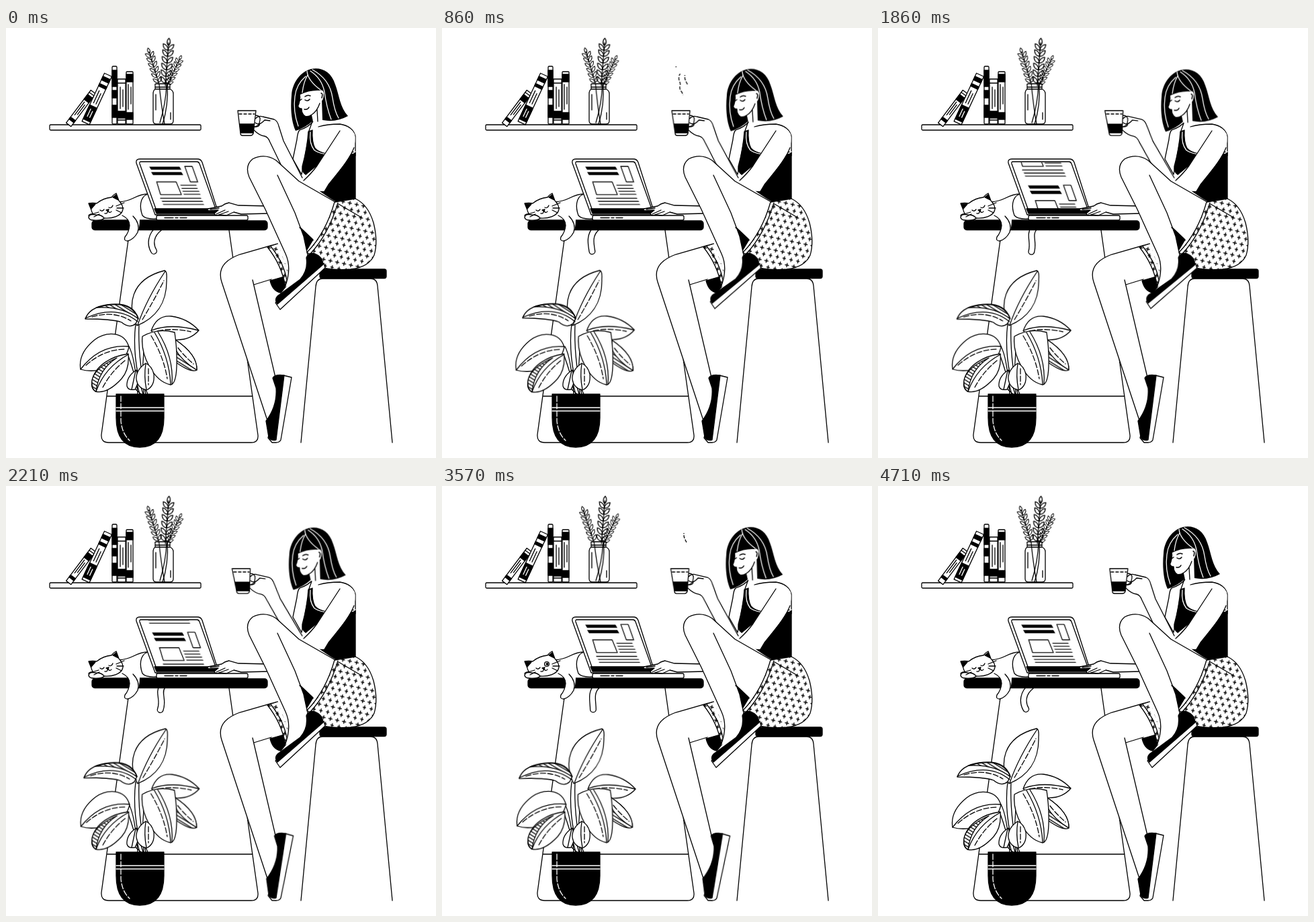
Recreate the animation shown at these times as an HTML page without scripts. Size 640 by 640 pixels, loop 4780 ms.

```html
<!DOCTYPE html>
<html lang="en">
<head>
<meta charset="utf-8">
<title>Coffee break</title>
<style>
  html, body { margin: 0; width: 100%; height: 100%; overflow: hidden; background: #fff; }
  svg { display: block; width: 100vw; height: 100vh; fill: none; stroke: #000; stroke-width: 1.3; stroke-linecap: round; stroke-linejoin: round; }
  .w { fill: #fff; }
  .b { fill: #000; }
  .paper { fill: #fff; stroke: none; }
  .light { stroke: #fff; fill: none; }
  .dash { stroke-dasharray: 8 3; }
  .tick { stroke-dasharray: 4 3; }
  .plus { fill: url(#plus); }
  .hatch { fill: url(#hatch); }
  .leaflets path, .leaflets use { vector-effect: non-scaling-stroke; }

  /* Cup arm, head and steam share one slow lean */
  .arm, .head, .steam { animation: 4.78s cubic-bezier(.3,.15,.7,.85) infinite; }
  .arm { animation-name: arm; transform-origin: 442px 225px; }
  .head { animation-name: head; }
  .steam { animation-name: steam; }
  @keyframes arm { 50% { transform: skewX(5deg); } }
  @keyframes head { 50% { transform: translate(-3.5px, 1.7px); } }
  @keyframes steam { 50% { transform: translateX(-8px); } }

  .sway { animation: sway 4.78s ease-in-out infinite; transform-origin: 200px 545px; }
  .sprig { transform-origin: 235px 143px; animation-delay: -4.5s; }
  @keyframes sway {
    0%, 100% { transform: rotate(0); }
    19% { transform: rotate(calc(var(--a) * 1deg)); }
    64% { transform: rotate(calc(var(--a) * -2deg)); }
  }

  .tap { animation: tap 4.78s ease-in-out infinite; transform-origin: 460px 345px; }
  @keyframes tap { 0%, 9%, 46%, 100% { transform: rotate(0); } 30% { transform: rotate(4deg); } }
  .heel { animation: heel 4.78s ease-in-out infinite; transform-origin: 402px 614px; }
  @keyframes heel { 0%, 37.5%, 85.5%, 100% { transform: rotate(0); } 61% { transform: rotate(5.4deg); } }

  .scroll { animation: scroll 4.78s linear infinite; }
  @keyframes scroll { 0%, 20% { transform: none; } 51.5%, 100% { transform: translateY(-70px); } }

  .open { animation: peek 4.78s step-end infinite; opacity: 0; }
  .shut { animation: hide 4.78s step-end infinite; }
  @keyframes peek { 55% { opacity: 1; } 80% { opacity: 0; } }
  @keyframes hide { 55% { opacity: 0; } 80% { opacity: 1; } }
</style>
</head>
<body>
<svg viewBox="0 0 640 640">
  <defs>
    <pattern id="plus" width="10.4" height="18" patternUnits="userSpaceOnUse" patternTransform="rotate(12)">
      <path d="M0 0H11V18H0Z" class="paper"/>
      <path d="M1 4.500h5M3.500 2v5M6 13.500h4M8 11v5" stroke-width="1.400"/>
    </pattern>
    <pattern id="hatch" width="10" height="4.500" patternUnits="userSpaceOnUse" patternTransform="rotate(32)">
      <path d="M0 0H10V5H0Z" class="paper"/>
      <path d="M-1 2H11"/>
    </pattern>
    <clipPath id="screen"><path d="M200 200H286L312 269H222Z"/></clipPath>
    <clipPath id="puffA"><rect x="330" width="50" y="118" height="0">
      <animate attributeName="y" dur="4.78s" repeatCount="indefinite" keyTimes="0;.02;.1;.18;.481;.613;.732;1" values="118;118;62;57;118;61;57;57" />
      <animate attributeName="height" dur="4.78s" repeatCount="indefinite" keyTimes="0;.02;.1;.18;.19;.481;.613;.732;1" values="0;0;38;3;0;0;33;0;0"/>
    </rect></clipPath>
    <clipPath id="puffB"><rect x="330" width="50" y="118" height="0">
      <animate attributeName="y" dur="4.78s" repeatCount="indefinite" keyTimes="0;.04;.18;.272;.533;.613;.67;.74;1" values="118;118;68;68;118;86;68;68;68"/>
      <animate attributeName="height" dur="4.78s" repeatCount="indefinite" keyTimes="0;.04;.18;.272;.533;.613;.67;.74;1" values="0;0;32;0;0;23;27;0;0"/>
    </rect></clipPath>
    <clipPath id="puffC"><rect x="330" width="50" y="118" height="0">
      <animate attributeName="y" dur="4.78s" repeatCount="indefinite" keyTimes="0;.07;.18;.23;.586;.613;.69;.747;1" values="118;118;70;70;118;107;70;70;70"/>
      <animate attributeName="height" dur="4.78s" repeatCount="indefinite" keyTimes="0;.07;.18;.23;.586;.613;.69;.747;.785;1" values="0;0;14;0;0;8;30;14;0;0"/>
    </rect></clipPath>

    <path id="pair" d="M0 0C0-5 4-9 8-9C8-4 5 0 0 0C0-5-4-9-8-9C-8-4-5 0 0 0"/>
    <g id="branch">
      <path d="M0 0V-64M0-60C-4-64-2-69 0-71C2-69 4-64 0-60"/>
      <use href="#pair" y="-4"/><use href="#pair" y="-14"/><use href="#pair" y="-24"/>
      <use href="#pair" y="-34"/><use href="#pair" y="-44"/><use href="#pair" y="-53"/>
    </g>
    <g id="page">
      <path class="b" d="M0 6.500H45L46 11H1ZM0 14.500H45L46 19H1Z" stroke="none"/>
      <path d="M53 6H64V29H53ZM3 29H32L33 48H2Z"/>
      <path d="M37 34H60M37 38.500H60M37 43H61M37 47.500H61M0 53.500H60M1 58H61M1 62.500H61" stroke-width="1.200"/>
    </g>
  </defs>

  <path d="M0 0H640V640H0Z" class="paper"/>

  <!-- Shelf, books, jar -->
  <g>
    <rect x="65" y="144" width="225" height="8" rx="1.500"/>
    <g transform="translate(92 138) rotate(37)">
      <path class="w" d="M0 0V-57H9V4H0Z"/>
      <path class="b" d="M0-49H9V-40H0ZM0-7H9V-3H0Z"/><path d="M0-53H9M3-37V-13M6-34V-16"/>
    </g>
    <g transform="translate(114 137) rotate(25)">
      <path class="w" d="M0 0V-77H12V2H0Z"/>
      <path class="b" d="M0-72H12V-66H0ZM0-60H12V-56H0ZM0-25H12V-2H0Z"/><path d="M4-50V-30M8-47V-30"/>
      <path class="light" d="M4-20V-8M8-18V-8"/>
    </g>
    <rect class="w" x="158" y="57" width="7" height="86" rx="1.500"/>
    <path class="b" d="M158 63H165V87H158ZM158 93H165V104H158ZM158 115H165V133H158Z"/>
    <rect class="w" x="166" y="76" width="12" height="67"/>
    <path class="b" d="M166 124H178V134H166Z"/>
    <path d="M166 82H178M170 88V120M174 92V117M166 137H178"/>
    <rect class="w" x="179" y="65" width="10" height="78" rx="1"/>
    <path class="b" d="M179 69H189V80H179ZM179 126H189V136H179Z"/>
    <path d="M182 84V121M186 88V113"/>

    <g class="leaflets">
      <g class="sway sprig" style="--a:.8"><path d="M228 84Q231 115 236 143"/><use href="#branch" transform="translate(228 84) rotate(-17) scale(.8)"/></g>
      <g class="sway sprig" style="--a:-.4"><path d="M239 84Q238 112 229 141M240 84Q242 115 233 143"/><use href="#branch" transform="translate(240 86) rotate(25) scale(.7)"/></g>
      <g class="sway sprig" style="--a:-.1"><use href="#branch" transform="translate(237 86) rotate(4.500)"/></g>
    </g>
    <path d="M222 85Q221 83 224 83H242Q246 83 244 85V91H222ZM222 91Q219 93 219 98V138Q219 143 224 143H244Q249 143 249 138V98Q249 93 244 91M222 88H244M223 99V122M245 126V136"/>
  </g>

  <!-- Desk frame -->
  <path d="M184 301L142 605Q141 617 153 617H365Q376 617 375 606L332 301M151 548H367"/>

  <!-- Cat tail -->
  <g>
    <path stroke-width="10" d="M228 298C215 308 214 322 220 332"><animate id="tail" attributeName="d" dur="4.78s" repeatCount="indefinite" calcMode="spline" keySplines=".3 .15 .7 .85;.3 .15 .7 .85" keyTimes="0;.49;1" values="M228 298C215 308 214 322 220 332;M233 298C226 308 236 318 230 333;M228 298C215 308 214 322 220 332"/></path>
    <path stroke="#fff" stroke-width="7.400" d="M228 298C215 308 214 322 220 332"><animate attributeName="d" dur="4.78s" repeatCount="indefinite" calcMode="spline" keySplines=".3 .15 .7 .85;.3 .15 .7 .85" keyTimes="0;.49;1" values="M228 298C215 308 214 322 220 332;M233 298C226 308 236 318 230 333;M228 298C215 308 214 322 220 332"/></path>
  </g>

  <!-- Far leg and stool -->
  <path class="w" d="M411 319L348 337Q312 350 321 378L388 584L401 518L368 382L397 374" stroke="none"/>
  <path d="M411 319L348 337Q312 350 321 378L389 584M401 520L367 375M369 382L395 374"/>
  <g class="heel">
    <path class="w" d="M413 517L425 520L409 613Q407 617 402 617H396L390 610Z"/>
    <path class="b" d="M397 521Q400 515 414 517L402 613Q394 615 391 609L387 585Q404 562 402 536Z"/>
  </g>
  <path class="b" d="M393 376L414 370L417 384L409 394Q397 392 393 376ZM438 297L457 315L448 330L440 312Z"/>
  <path class="plus" d="M389 326L411 319Q426 335 424 352L416 385Q410 352 389 326Z"/>
  <path d="M394 325Q414 350 418 376"/>
  <path d="M439 617L461 385Q462 373 471 373H543Q552 373 553 384L575 617"/>
  <rect class="b" x="467" y="359" width="99" height="13.500" rx="3"/>

  <!-- Desk top, cat -->
  <rect class="b" x="128" y="287" width="261" height="13.500" rx="4"/>
  <path class="w" d="M168 259Q180 258 190 253Q202 247 211 247L230 255V286H130Q123 284 123 279Q125 276 132 277Z"/>
  <path d="M211 247C198 252 199 268 203 279Q208 285 224 284"/>
  <path class="paper" d="M175 279Q184 285 184 294Q183 304 177 311Q175 317 181 317Q190 315 196 304Q199 296 199 284Z"/>
  <path d="M173 279Q184 284 184 294Q183 304 177 311Q175 317 181 317Q190 315 196 304Q200 291 189 280"/>
  <path class="w" d="M127 271L123 261Q129 260 135 261Q145 253 157 252Q160 248 164 246L168 257Q174 263 174 270C172 280 158 284 146 283Q129 282 127 271Z"/>
  <path class="b" d="M127 269L124 262L133 262ZM159 252L164 248L167 256ZM149 271L153 270L152 273Z"/>
  <path class="w" d="M123 282Q124 276 134 278Q143 278 146 283Q143 287 130 286Q124 286 123 282Z"/>
  <path d="M151 273Q151 277 147 276M152 273Q155 276 157 273M140 271Q143 274 146 270M164 265L176 260M165 268L175 268M164 271L172 275M138 274L128 277M139 277L131 281"/>
  <path class="shut" d="M153 267Q157 269 159 264"/>
  <g class="open"><circle class="w" cx="156" cy="265" r="3.400"/><circle class="b" cx="156.500" cy="265" r="1.300"/></g>

  <!-- Laptop -->
  <path class="w" d="M222 278L194 201Q193 195 199 195H285Q290 195 292 200L317 278Z"/>
  <path d="M223 269L199 202Q198 199 201 199H284Q287 199 288 202L312 269"/>
  <path class="b" d="M221 269H312L315 276H224Z"/>
  <g clip-path="url(#screen)">
    <g transform="matrix(1 0 .355 1 211 200)"><g class="scroll"><use href="#page"/><use href="#page" y="70"/></g></g>
  </g>
  <rect class="w" x="224" y="279" width="136" height="7" rx="2"/>
  <path d="M236 282.500H249M252 282.500H256M259 282.500H269"/>

  <!-- Typing arm -->
  <path class="w" d="M390 265L346 264L332 260Q326 261 321 265L301 269Q298 272 304 272L316 271L310 276Q311 280 317 278L328 279L339 274L350 277L392 276"/>
  <path d="M313 277L326 271M317 278L331 273M304 270L317 268"/>

  <!-- Torso -->
  <path class="w" d="M457 139Q451 147 437 152Q434 155 433 166L427 195L440 218L447 180L452 152"/>
  <path class="paper" d="M452 150L466 140L500 144L520 158V192H448Z"/>
  <path d="M456 139L451 153M465 147Q478 143 497 143Q516 146 520 161V190"/>
  <path class="b" d="M450 154C449 170 447 184 441 206Q440 214 446 218L455 234L490 258L520 255V185L506 184L500 188Q470 190 460 179Q455 170 456 152Z"/>
  <path class="light" d="M453 155Q451 172 459 182Q468 188 482 188M509 186Q516 188 520 184"/>
  <path class="paper" d="M500 147L463 205L440 224L446 242L474 243L480 233C495 214 509 197 517 180Q521 168 519 158Q514 147 500 147Z"/>
  <path d="M497 153L463 205Q455 216 443 227M474 243L480 233C495 214 511 197 518 178"/>

  <!-- Head -->
  <g class="head">
    <path class="b" stroke="none" d="M454 61C438 65 426 82 425 100C423 120 425 140 431 153Q445 149 457 138L471 137Q491 141 509 131C497 118 496 100 490 84C484 65 470 58 454 61Z"/>
    <path class="paper" d="M454 125L457 139L465 144L471 138L470 106Z"/>
    <path class="paper" d="M438 99Q439 108 435 117Q436 120 440 120Q440 128 445 131Q449 133 455 129Q463 124 468 110Q473 108 473 97Q472 91 467 93Q452 92 438 99Z"/>
    <path d="M435 117Q436 120 440 120Q440 128 445 131Q449 133 455 129Q463 124 467 112M463 121L464 139"/>
    <path d="M444 121Q449 122 451 118M445 107Q449 110 452 106M437 108L440 106M445 102Q449 99 453 101M469 97Q472 97 470 104" stroke-width="1.500"/>
    <path class="light" d="M448 64Q449 78 468 92M446 72Q432 84 430 102Q427 124 435 146M453 64Q470 75 474 95Q477 118 484 136M456 62Q482 76 486 104Q489 124 495 134M449 70Q443 80 441 96"/>
  </g>

  <!-- Cup arm -->
  <g class="arm">
    <path class="w" stroke="none" d="M371 133Q377 129 383 132L402 137L407 148L414 170L443 226L424 232L391 167Q388 161 382 160L369 150Z"/>
    <path d="M371 135Q376 130 382 132L399 136Q404 138 406 146L413 168L441 223M371 141Q377 146 385 137L393 138M371 147Q377 147 378 142M369 152Q377 160 385 161Q390 162 393 170L422 230"/>
    <path d="M371 130Q379 130 378 137Q377 146 370 147"/>
    <path class="w" d="M345 123H372L368 157Q367 160 364 160H352Q349 160 349 157Z"/>
    <path class="b" d="M348 143H369.500L368 156H349.500Z"/>
    <path class="tick" d="M347 128H370"/>
  </g>

  <g class="steam tick">
    <path clip-path="url(#puffA)" d="M352 118C345 108 354 100 351 93S344 75 346 69S351 62 351 57"/>
    <path clip-path="url(#puffB)" d="M364 118C364 110 362 104 361 99S355 92 357 86S352 78 357 68"/>
    <path clip-path="url(#puffC)" d="M367 118C372 108 366 100 366 96S370 88 367 82S364 76 364 70"/>
  </g>

  <!-- Crossed leg and shorts -->
  <path class="paper" d="M490 258L436 228L402 197Q385 186 367 195Q355 205 362 222L386 270L422 346L416 386L450 345L443 310L430 275L464 316Z"/>
  <path class="paper" d="M404 219L449 337L425 376L386 270Z"/>
  <path d="M490 259L436 228L402 197Q385 186 367 195Q355 205 362 222L386 270L416 336Q426 358 415 386M404 219L430 275L443 310L449 338M437 297L457 316"/>
  <path class="plus" d="M489 259L520 254Q539 263 547 290Q554 318 548 338Q540 356 513 359Q490 361 473 357Q466 345 448 334Q476 305 489 259Z"/>
  <path d="M494 260Q480 307 453 336M495 262L529 282"/>
  <g class="tap">
    <path class="w" d="M473 350L475 357L408 419L401 409Z"/>
    <path class="b" d="M447 342Q451 333 460 336Q471 340 472 352L404 411Q399 405 404 399L438 374Q450 360 447 342Z"/>
  </g>

  <!-- Plant -->
  <g>
    <path d="M193 440Q187 490 204 545M198 440Q196 490 208 545M183 474Q192 490 196 545M208 458Q201 500 205 545M182 488Q190 510 199 545M208 538L211 545M192 537L201 545"/>
    <g class="sway" style="--a:-.4">
      <path class="w" d="M195 443C180 415 184 374 236 361Q240 362 239 374C240 410 222 432 195 443Z"/>
      <path d="M196 442Q209 404 237 362"/><path class="dash" d="M203 434Q220 406 235 376"/>
    </g>
    <g class="sway" style="--a:1">
      <path class="w" d="M118 433Q124 416 150 412Q188 406 197 432L193 440Q184 448 172 438Q158 433 118 433Z"/>
      <path class="hatch" d="M135 416Q186 402 197 433Q174 414 135 416Z"/>
      <path d="M118 432Q164 411 196 437"/><path class="dash" d="M128 430Q160 420 186 436"/>
    </g>
    <g class="sway" style="--a:-.4">
      <path class="w" d="M216 451Q224 427 246 429Q270 432 287 450Q274 465 252 464Q232 460 216 451Z"/>
      <path d="M217 450Q245 439 286 450"/><path class="dash" d="M226 451Q248 446 275 452"/>
    </g>
    <g class="sway" style="--a:.5">
      <path class="hatch" d="M252 464Q285 486 284 509Q276 514 252 497Z"/>
      <path class="w" d="M252 464Q285 486 284 509Q262 496 252 478Z"/><path class="dash" d="M256 476Q266 489 279 500"/>
    </g>
    <g class="sway" style="--a:-.8">
      <path class="w" d="M183 475C176 450 148 452 132 464Q107 484 111 508Q130 514 160 504Q176 500 183 475Z"/>
      <path d="M111 508Q140 470 183 474"/><path class="dash" d="M119 502Q146 478 178 478"/>
    </g>
    <g class="sway" style="--a:-.4">
      <path class="w" d="M182 485C158 488 132 502 128 526Q126 536 133 541Q151 545 172 522Q184 508 182 485Z"/>
      <path class="hatch" d="M165 491C140 502 126 516 128 530Q128 538 134 541Q138 508 165 491Z"/>
      <path d="M182 486Q147 505 134 541"/><path class="dash" d="M177 495Q156 512 144 535"/>
    </g>
    <g class="sway" style="--a:.2">
      <path class="w" d="M203 459Q225 446 251 453Q255 480 254 504Q253 530 245 531C220 526 200 488 203 459Z"/>
      <path d="M221 453Q243 490 245 530M226 452Q250 490 247 530"/><path class="dash" d="M216 458Q235 490 240 522"/>
    </g>
    <path class="w" d="M194 509Q179 519 180 533Q182 540 192 538Q200 525 194 509Z"/>
    <path class="w" d="M208 499Q193 509 194 523Q196 536 209 539Q222 533 220 515Q217 503 208 499Z"/>
    <path d="M193 510L187 538M208 500Q205 518 209 538"/><path class="dash" d="M212 507V531"/>
    <path class="b" d="M164 545H235V580Q235 624 199 624Q164 624 164 580Z"/>
    <path class="light" d="M164 565H235M164 570H235"/>
    <path class="light dash" d="M171 548V585Q173 604 184 614"/>
  </g>
</svg>
</body>
</html>
```
